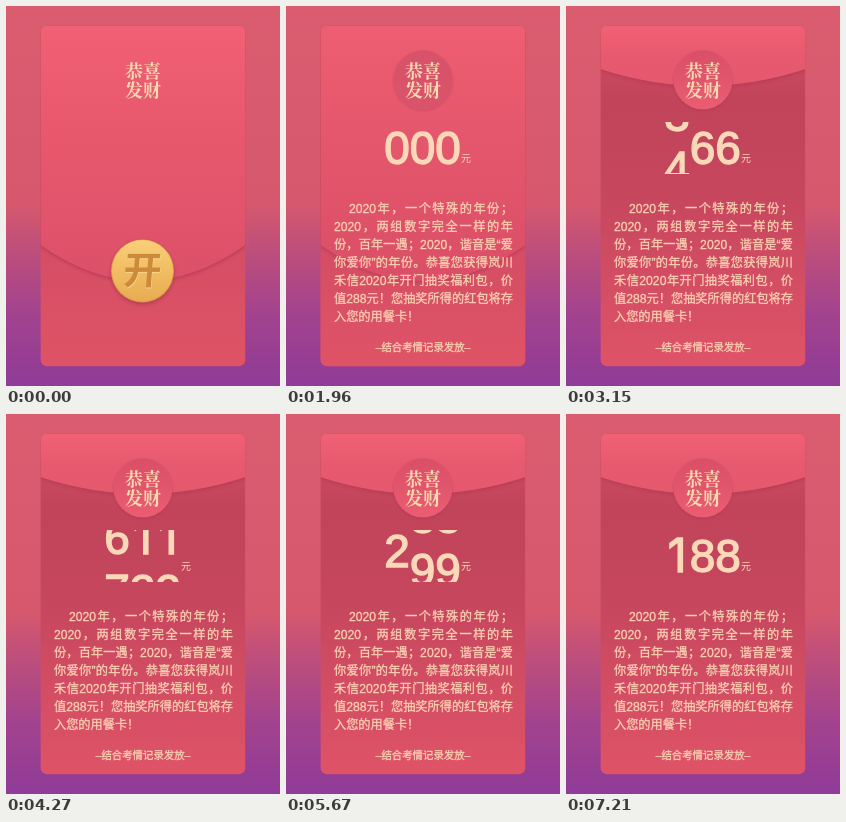
Animation, 274 px wide and 380 px high, one loop 7.28 s. Source, as an HTML page with a canvas:

```html
<!DOCTYPE html>
<html lang="zh-CN">
<head>
<meta charset="utf-8">
<title>恭喜发财</title>
<style>
  html, body { margin: 0; width: 100%; height: 100%; overflow: hidden; }
  #stage { position: relative; width: 274px; height: 380px; overflow: hidden; }
  canvas { position: absolute; left: 0; top: 0; }
  #letter {
    position: absolute; left: 48px; top: 194px; width: 179px;
    color: #f9d0b2; -webkit-text-stroke: .3px #f9d0b2;
    font: 500 12.2px/18px "Liberation Sans", "Noto Sans CJK SC", "Noto Sans CJK", sans-serif;
  }
  #letter p { margin: 0; white-space: nowrap; text-align: justify; text-align-last: justify; }
  #letter p:first-child { text-indent: 15px; }
  #letter p:nth-child(7) { text-align-last: left; }
  #letter footer { position: absolute; left: -1px; top: 139px; width: 180px; text-align: center; font-size: 10.4px; }
</style>
</head>
<body>
<div id="stage">
  <canvas id="view"></canvas>
  <div id="letter">
    <p>2020年，一个特殊的年份；</p>
    <p>2020，两组数字完全一样的年</p>
    <p>份，百年一遇；2020，谐音是“爱</p>
    <p>你爱你”的年份。恭喜您获得岚川</p>
    <p>禾信2020年开门抽奖福利包，价</p>
    <p>值288元！您抽奖所得的红包将存</p>
    <p>入您的用餐卡！</p>
    <footer>–结合考情记录发放–</footer>
  </div>
</div>
<script>
const W = 274, H = 380, LOOP = 7280, STEP = 70;
const SPIN_START = 700, SPIN_END = 1890, OPEN = 1960, FADE = 350;
const CARD = { x: 34.4, y: 19.4, w: 205, h: 341 };
const CREAM = '#fad9b8';
const CJK = '"Noto Sans CJK SC", "Noto Sans CJK", sans-serif';

// Reel positions in digits, rolling upward
const reelTimes = [1960, 3150, 4270, 4830, 5670, 7210];
const hundreds = [0, 3.62, 16.34, 24.05, 32.1, 41];
const units = [0, 6, 21.34, 30, 38.73, 48];

const canvas = document.getElementById('view');
const letter = document.getElementById('letter');
const ctx = canvas.getContext('2d');
const ratio = window.devicePixelRatio || 1;
canvas.width = W * ratio;
canvas.height = H * ratio;
canvas.style.width = W + 'px';
canvas.style.height = H + 'px';

const clamp = v => Math.max(0, Math.min(1, v));

function smoothPath(times, values, t) {
  const last = times.length - 1;
  if (t >= times[last]) return values[last];
  const i = Math.max(0, times.findIndex(x => x > t) - 1);
  const slope = k => k <= 0 || k >= last ? 0
    : (values[k + 1] - values[k - 1]) / (times[k + 1] - times[k - 1]);
  const span = times[i + 1] - times[i], u = (t - times[i]) / span;
  const a = u * u * (3 - 2 * u);
  return values[i] * (1 - a) + values[i + 1] * a
    + span * u * (1 - u) * ((1 - u) * slope(i) - u * slope(i + 1));
}

function vertical(y0, y1, ...stops) {
  const g = ctx.createLinearGradient(0, y0, 0, y1);
  stops.forEach(([at, color]) => g.addColorStop(at, color));
  return g;
}

function disc(x, y, r, fill) {
  ctx.beginPath();
  ctx.arc(x, y, r, 0, Math.PI * 2);
  ctx.fillStyle = fill;
  ctx.fill();
}

function label(text, x, y, font, color) {
  ctx.font = font;
  ctx.fillStyle = color;
  ctx.textAlign = 'center';
  ctx.textBaseline = 'alphabetic';
  ctx.fillText(text, x, y);
}

function shadow(color, blur, dy) {
  ctx.shadowColor = color;
  ctx.shadowBlur = blur * ratio;
  ctx.shadowOffsetY = dy * ratio;
}

function clipCard() {
  ctx.beginPath();
  ctx.roundRect(CARD.x, CARD.y, CARD.w, CARD.h, 7);
  ctx.clip();
}

function flap(edge, middle, fill) {
  const right = CARD.x + CARD.w;
  ctx.beginPath();
  ctx.moveTo(CARD.x, CARD.y);
  ctx.lineTo(right, CARD.y);
  ctx.lineTo(right, edge);
  ctx.quadraticCurveTo(137, 2 * middle - edge, CARD.x, edge);
  ctx.closePath();
  ctx.fillStyle = fill;
  ctx.fill();
}

function background() {
  ctx.fillStyle = vertical(0, H, [0, '#da5c6f'], [.52, '#d6586d'],
    [.64, '#be4f7b'], [.8, '#a4438d'], [1, '#8f3b98']);
  ctx.fillRect(0, 0, W, H);
}

function title() {
  const font = '900 18px "Noto Serif CJK SC", ' + CJK;
  label('恭喜', 137, 72, font, '#f9d9b2');
  label('发财', 137, 91, font, '#f9d9b2');
}

function closedCard() {
  ctx.save();
  clipCard();
  ctx.fillStyle = vertical(230, 360, [0, '#d44d64'], [1, '#df5366']);
  ctx.fillRect(CARD.x, CARD.y, CARD.w, CARD.h);
  shadow('rgba(150,35,65,.55)', 4, 1);
  flap(239, 275, vertical(20, 275, [0, '#f16074'], [.45, '#e7586d'], [1, '#dc5068']));
  ctx.restore();
}

function coin(t) {
  const turn = clamp((t - SPIN_START) / (SPIN_END - SPIN_START));
  const side = Math.cos(turn * Math.PI * 4);
  ctx.save();
  ctx.translate(136.5, 265);
  ctx.scale(Math.abs(side) < .06 ? .06 : side, 1);
  shadow('rgba(130,35,50,.45)', 4, 2);
  disc(0, 0, 31.5, '#dfa04b');
  ctx.shadowColor = 'transparent';
  disc(0, -.5, 30.5, vertical(-31, 31, [0, '#f8cf78'], [.5, '#f1bd62'], [1, '#e8ab50']));
  ctx.transform(1, 0, -.08, 1, 0, 0);
  label('开', .5, 14, '700 38px ' + CJK, '#f9d58a');
  label('开', 0, 13, '700 38px ' + CJK, '#cc8a3c');
  ctx.restore();
}

function openCard(closedAlpha) {
  ctx.save();
  clipCard();
  ctx.fillStyle = vertical(60, 360, [0, '#c9485f'], [.12, '#c1445b'],
    [.4, '#c5465d'], [.7, '#d24d63'], [1, '#df5367']);
  ctx.fillRect(CARD.x, CARD.y, CARD.w, CARD.h);
  shadow('rgba(140,35,60,.35)', 4, 1);
  flap(63, 80, vertical(20, 80, [0, '#f06175'], [.5, '#e7596e'], [1, '#e6586d']));
  ctx.restore();

  ctx.save();
  ctx.globalAlpha = closedAlpha;
  closedCard();
  ctx.globalAlpha = 1;
  shadow('rgba(150,40,65,.35)', 3, 1);
  disc(137, 74, 29.5, vertical(44, 104, [0, '#d94f67'], [1, '#eb5d72']));
  ctx.shadowColor = 'transparent';
  ctx.globalAlpha = closedAlpha;
  disc(137, 74, 29.5, '#d9546a');
  ctx.restore();
}

function reel(x, position) {
  const pitch = 53, base = Math.floor(position + 1e-6);
  ctx.lineWidth = 1.4;
  ctx.strokeStyle = CREAM;
  for (let k = 0; k < 2; k++) {
    const y = 158 + (base + k - position) * pitch;
    const digit = (base + k) % 10;
    // Inter draws the 1 without a foot
    const family = digit === 1 ? 'Inter' : '"Liberation Sans"';
    label(digit, x, y, `46px ${family}, sans-serif`, CREAM);
    ctx.strokeText(digit, x, y);
  }
}

function amount(t) {
  ctx.save();
  ctx.beginPath();
  ctx.rect(90, 116, 95, 52);
  ctx.clip();
  const unit = smoothPath(reelTimes, units, t);
  reel(111, smoothPath(reelTimes, hundreds, t));
  reel(136.5, unit);
  reel(162, unit);
  ctx.restore();
  label('元', 180, 156, '500 10px ' + CJK, CREAM);
}

function draw(t) {
  const opened = t >= OPEN;
  ctx.setTransform(ratio, 0, 0, ratio, 0, 0);
  background();
  if (opened) {
    openCard(.95 * clamp(1 - (t - OPEN) / FADE));
    amount(t);
  } else {
    closedCard();
    coin(t);
  }
  title();
  letter.style.visibility = opened ? 'visible' : 'hidden';
}

const start = performance.now();
function tick() {
  const t = (performance.now() - start) % LOOP;
  draw(Math.floor(t / STEP) * STEP);
  requestAnimationFrame(tick);
}
tick();
</script>
</body>
</html>
```
